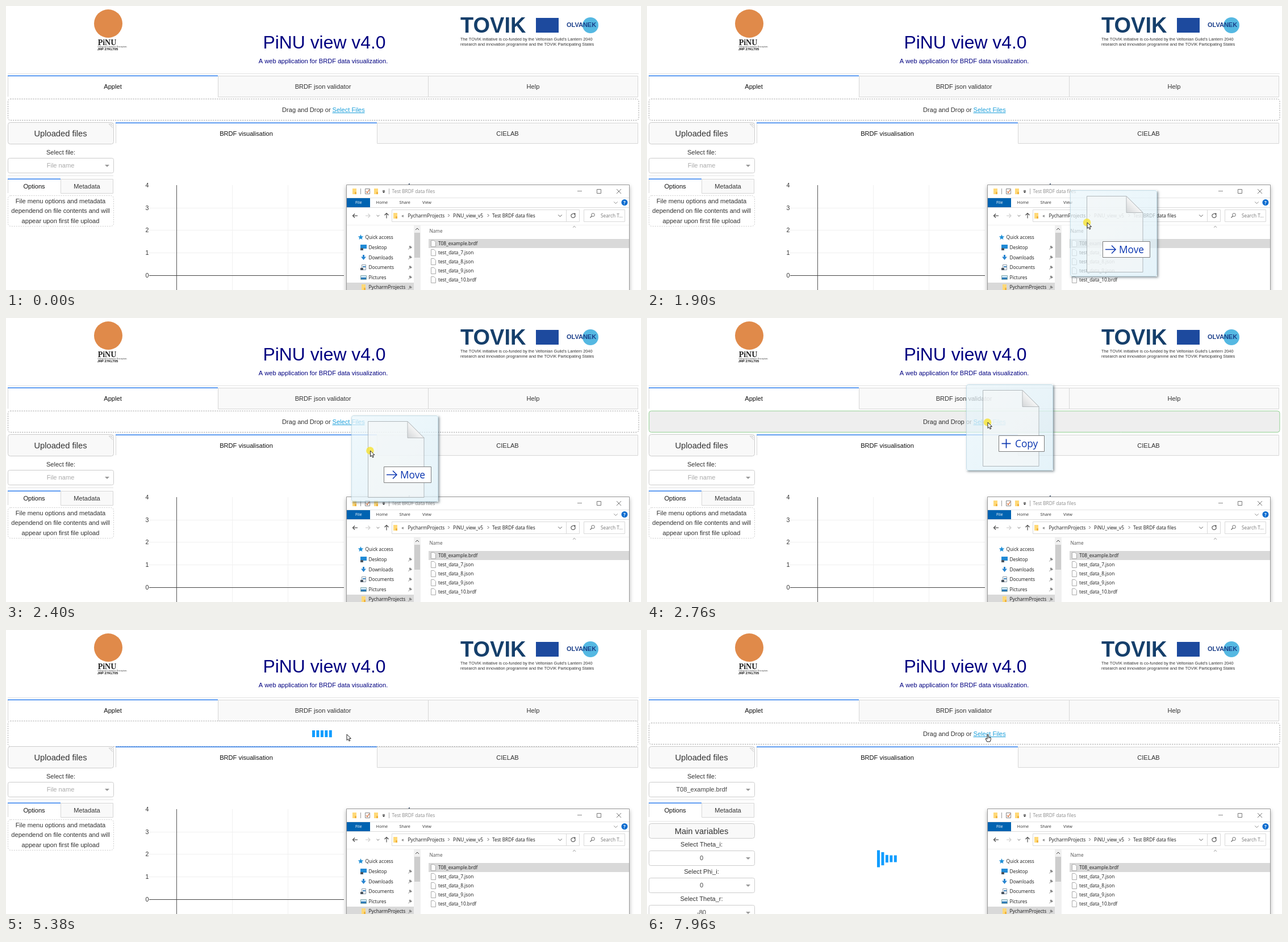
Recreate the animation shown at these times as an HTML page with a canvas. Size 1118 px wide and 501 px high, loop 8 s.

```html
<!DOCTYPE html>
<html lang="en">
<head>
<meta charset="utf-8">
<title>BRDF viewer upload</title>
<style>
html, body { margin: 0; width: 100%; height: 100%; overflow: hidden; background: #fff; }
canvas { display: block; }
</style>
</head>
<body>
<canvas id="stage" width="1118" height="501"></canvas>
<script>
const ctx = document.getElementById('stage').getContext('2d');
const SANS = '"Liberation Sans", Arial, sans-serif';
const UI = '"Open Sans", "Noto Sans", sans-serif';
const SERIF = '"Liberation Serif", serif';
const LOOP = 8000, BODY = 11.1, UI_SIZE = 8.3;
const BLUE = '#2f7fee', EDGE = '#d6d6d6', LOADER = '#119dff';

// ---------- drawing helpers ----------
function text(str, x, y, color = '#333', size = BODY, align = 'center', family = SANS, weight = '') {
  ctx.font = `${weight} ${size}px ${family}`;
  ctx.textAlign = align;
  ctx.fillStyle = color;
  ctx.fillText(str, x, y);
}
const ui = (str, x, y, color = '#1a1a1a', size = UI_SIZE) => text(str, x, y, color, size, 'left', UI);

function fill(x, y, w, h, color) {
  ctx.fillStyle = color;
  ctx.fillRect(x, y, w, h);
}
function box(x, y, w, h, r, bg, edge, dash = []) {
  ctx.beginPath();
  ctx.roundRect(x, y, w, h, r);
  if (bg) { ctx.fillStyle = bg; ctx.fill(); }
  ctx.setLineDash(dash);
  ctx.strokeStyle = edge;
  ctx.lineWidth = 1;
  ctx.stroke();
  ctx.setLineDash([]);
}
function line(points, color, width = 1) {
  ctx.beginPath();
  for (let i = 0; i < points.length; i += 2) ctx.lineTo(points[i], points[i + 1]);
  ctx.strokeStyle = color;
  ctx.lineWidth = width;
  ctx.stroke();
}
function shape(points, color, edge) {
  ctx.beginPath();
  for (let i = 0; i < points.length; i += 2) ctx.lineTo(points[i], points[i + 1]);
  ctx.closePath();
  ctx.fillStyle = color;
  ctx.fill();
  if (edge) { ctx.strokeStyle = edge; ctx.lineWidth = 1; ctx.stroke(); }
}
function disc(x, y, r, color) {
  ctx.beginPath();
  ctx.arc(x, y, r, 0, 2 * Math.PI);
  ctx.fillStyle = color;
  ctx.fill();
}

// ---------- web page ----------
function header() {
  disc(180, 31, 25, '#e08a4a');
  text('PiNU', 178, 69, '#222', 14, 'center', SERIF, 'bold');
  text('Orthogonal Luminance Descriptions', 187, 73, '#333', 3.5, 'center', SERIF);
  text('JRP 27KLT05', 179, 78, '#111', 5.8, 'center', SANS, 'bold');

  text('PiNU view v4.0', 560.5, 75, '#000080', 31.9);
  text('A web application for BRDF data visualization.', 558.5, 101, '#000080');

  text('TOVIK', 800, 47, '#153f6b', 38, 'left', SANS, 'bold');
  fill(933, 21, 40, 26, '#1d4a9e');
  disc(1029, 34, 14, '#55b8e2');
  text('OLVANEK', 987, 37, '#1b3f8a', 11, 'left', SANS, 'bold');
  text("The TOVIK initiative is co-funded by the Veltonian Guild's Lantern 2040", 800, 60.5, '#333', 7.4, 'left');
  text('research and innovation programme and the TOVIK Participating States', 800, 69.5, '#333', 7.4, 'left');
  fill(3, 119, 1111, 1, '#e1e1e1');
}

function tabs(x, y, w, h, labels) {
  labels.forEach((label, i) => {
    const left = x + i * w;
    if (i) {
      box(left + .5, y + .5, w - 1 + (i < labels.length - 1), h, 0, '#f9f9f9', EDGE);
    } else {
      line([left + .5, y, left + .5, y + h], EDGE);
      fill(left, y - .5, w, 1.5, BLUE);
    }
    text(label, left + w / 2, y + h / 2 + 4.7, i ? '#333' : '#111');
  });
}

function dropZone(t) {
  if (t >= 3330 && t < 6690) {
    box(3.5, 160.5, 1109, 45, 4, '#fff', '#a5a5a5', [2, 2]);
    loader(539, 183, t - 3315);
    return;
  }
  const active = t >= 2660 && t < 3160;
  if (active) box(3.5, 164, 1110.5, 37.5, 4, '#eee', '#93d193');
  else box(3.5, 164, 1110.5, 37.5, 4, '#fff', '#999', [2, 2]);
  text('Drag and Drop or', 486, 187, '#333', BODY, 'left');
  text('Select Files', 574.5, 187, '#1ea0db', BODY, 'left');
  fill(574.5, 188, 57, 1, '#1ea0db');
}

// Five bars stretch one after another, then rest.
function loader(x, cy, t) {
  const u = (t / 1205 % 1 + 1) % 1;
  for (let i = 0; i < 5; i++) {
    const v = Math.max(0, 1 - Math.abs(u - i / 12 - .2) / .2);
    const h = 12 + 18 * v * v * (3 - 2 * v);
    fill(x + i * 7.45, cy - h / 2, 5, h, LOADER);
  }
}

function dropdown(y, label, color = '#444') {
  box(3.5, y + .5, 186, 26, 3, '#fff', '#ccc');
  text(label, 96, y + 17, color);
  shape([174, y + 12, 182, y + 12, 178, y + 16], '#999');
}
function heading(y, h, label) {
  box(3.5, y + .5, 186, h, 4, '#f9f9f9', '#ccc');
  text(label, 96, y + h / 2 + 6, '#333', 14.7);
}

function sidebar(t) {
  const loaded = t >= 7080;
  heading(205, 38, 'Uploaded files');
  line([181, 208, 188, 215], '#bbb', .8);
  line([184, 208, 188, 212], '#bbb', .8);
  line([181, 208, 188, 208], '#ccc', .8);
  text('Select file:', 96.5, 261.5);
  if (loaded) dropdown(268, 'T08_example.brdf');
  else dropdown(268, 'File name', '#aaa');
  fill(3, 299, 186, 1, '#e1e1e1');
  tabs(3, 305, 93, 25, ['Options', 'Metadata']);

  if (!loaded) {
    box(3.5, 334.5, 186, 54, 5, null, '#ccc', [2, 2]);
    ['File menu options and metadata', 'dependend on file contents and will', 'appear upon first file upload']
      .forEach((s, i) => text(s, 96, 347.5 + i * 17.8));
    return;
  }
  fill(3, 337, 186, 1, '#e6e6e6');
  heading(341, 26, 'Main variables');
  [['Theta_i', '0'], ['Phi_i', '0'], ['Theta_r', '-80']].forEach(([name, value], i) => {
    text(`Select ${name}:`, 96, 382 + i * 48.2);
    dropdown(Math.round(389 + i * 48.2), value);
  });
}

function graph(t) {
  if (t >= 7740) {
    loader(405, 403.5, t - 7720);
    return;
  }
  for (let v = 0; v < 5; v++) {
    const y = Math.round(475 - v * 39.8);
    if (v && v < 4) fill(252, y, 343, 1, '#f0f0f0');
    text(v, 251.5, y + 4, '#333', 10.6, 'right');
  }
  fill(398, 316, 1, 185, '#f0f0f0');
  fill(496, 316, 1, 185, '#f0f0f0');
  fill(300, 316, 1, 185, '#555');
  fill(252, 475, 343, 1, '#444');
  text('4', 709, 320.5, '#2a3f5f');
  fill(760, 315, 2, 1, '#ccc');
}

// ---------- file window ----------
function folder(x, y, w = 8, h = 10) {
  fill(x, y, w, h, '#ffd978');
  fill(x + w - 3, y + h - 4, 3, 4, '#f0b440');
}
function chevron(x, y, dx, dy, color = '#555') {
  // dx, dy point where the tip goes
  line([x - dx - 2 * dy, y - dy - 2 * dx, x + dx, y + dy, x - dx + 2 * dy, y - dy + 2 * dx], color);
}
function arrow(x1, y1, x2, y2, color, head = 3.5, width = 1.1) {
  const d = Math.hypot(x2 - x1, y2 - y1), ux = (x2 - x1) / d * head, uy = (y2 - y1) / d * head;
  line([x1, y1, x2, y2], color, width);
  line([x2 - ux - uy, y2 - uy + ux, x2, y2, x2 - ux + uy, y2 - uy - ux], color, width);
}
function star(x, y, r, color) {
  const pts = [];
  for (let i = 0; i < 10; i++) {
    const a = i * Math.PI / 5 - Math.PI / 2, k = i % 2 ? r * .45 : r;
    pts.push(x + k * Math.cos(a), y + k * Math.sin(a));
  }
  shape(pts, color);
}

function titleBar() {
  folder(610, 322, 7);
  fill(624, 322, 1, 10, '#999');
  box(632.5, 322.5, 8, 9, 0, '#fff', '#888');
  line([634, 327, 636, 329.5, 639.5, 324], '#d2622a', 1.2);
  folder(648, 322, 7);
  fill(663, 325, 4, 1, '#333');
  shape([662.5, 327, 667.5, 327, 665, 330], '#333');
  fill(674, 322, 1, 10, '#aaa');
  ui('Test BRDF data files', 679.5, 330.2, '#8a8a8a');
  fill(1006, 326, 8, 1, '#888');
  box(1040.5, 323.5, 7, 7, 0, null, '#777');
  line([1075, 323, 1083, 331], '#777');
  line([1083, 323, 1075, 331], '#777');
}

function ribbon() {
  fill(600, 338, 497, 1, '#e3e3e3');
  fill(600, 339, 41, 16, '#0063b1');
  ui('File', 615, 349.2, '#fff', 7.3);
  ui('Home', 651.5, 349.2, '#333', 7.3);
  ui('Share', 692.5, 349.2, '#333', 7.3);
  ui('View', 733, 349.2, '#333', 7.3);
  chevron(1073.5, 347, 0, 1.6, '#888');
  disc(1089, 346.5, 5.5, '#0a6ccf');
  text('?', 1089, 349.5, '#fff', 8, 'center', UI, 'bold');
  fill(600, 355, 497, 1, '#dcdcdc');
}

function addressBar() {
  arrow(619, 370, 610.5, 370, '#444');
  arrow(633, 370, 641, 370, '#ccc');
  chevron(655, 370, 0, 1.2, '#777');
  arrow(670, 374.5, 670, 365.5, '#444');
  box(679.5, 359.5, 330, 21, 0, '#fff', '#d9d9d9');
  fill(986, 360, 1, 21, '#d9d9d9');
  folder(682, 365, 7);
  ui('«', 696.5, 372.5, '#333');
  ui('PycharmProjects', 707.5, 373);
  chevron(779.5, 369.5, 1.2, 0);
  ui('PiNU_view_v5', 787, 373);
  chevron(849, 369.5, 1.2, 0);
  ui('Test BRDF data files', 856, 373);
  chevron(975.5, 370, 0, 1.6);
  ctx.beginPath();
  ctx.arc(998.5, 370, 3.5, -.5, 5);
  ctx.strokeStyle = '#555';
  ctx.lineWidth = 1.1;
  ctx.stroke();
  shape([999, 365, 1003, 366, 1001.5, 369.5], '#555');
  box(1017.5, 359.5, 72, 21, 0, '#fff', '#d9d9d9');
  ctx.beginPath();
  ctx.arc(1033.5, 368.5, 2.8, 0, 7);
  ctx.strokeStyle = '#666';
  ctx.stroke();
  line([1031.5, 370.5, 1028.5, 373.5], '#666', 1.2);
  ui('Search T...', 1047, 373, '#777');
}

function navPane() {
  fill(600, 488, 118, 13, '#d9d9d9');
  star(624.5, 408, 5, '#1e90d8');
  ui('Quick access', 632.5, 411);
  ['Desktop', 'Downloads', 'Documents', 'Pictures', 'PycharmProjects'].forEach((name, i) => {
    const y = 426 + i * 17.6;
    ui(name, 638.5, y + 3);
    shape([711, y - 3.5, 715, y, 712, y + 2, 709.5, y - 1], '#888');
    line([711, y + .5, 708.5, y + 3.5], '#888');
  });
  fill(624, 421, 11, 7, '#1f8ad6');
  fill(624, 427, 5, 4, '#4a5560');
  fill(628, 439, 3, 4, '#2a86d1');
  shape([625, 442.5, 634, 442.5, 629.5, 448], '#2a86d1');
  box(626.5, 456.5, 7, 9, 0, '#fff', '#8a9aa8');
  fill(628, 459, 5, 2, '#3f86c0');
  fill(624, 462, 5, 4, '#4a5560');
  box(624.5, 475.5, 10, 7, 0, '#cfe8f8', '#8aa');
  fill(625, 479, 9, 3, '#2f7cb8');
  folder(626, 491, 7);
  fill(718, 386, 12, 115, '#f0f0f0');
  fill(719, 400, 10, 44, '#cdcdcd');
  chevron(724, 393.5, 0, -1.5, '#444');
}

function fileList(hover) {
  ui('Name', 745.5, 400, '#555');
  chevron(1000.5, 389.5, 0, -1.2, '#888');
  ['T08_example.brdf', 'test_data_7.json', 'test_data_8.json', 'test_data_9.json', 'test_data_10.brdf'].forEach((name, i) => {
    const y = 411 + i * 16;
    if (!i) fill(744, y, 353, 16, '#d9d9d9');
    else if (i === hover) fill(744, y, 353, 16, '#e5f3ff');
    shape([748.5, y + 2.5, 753.5, y + 2.5, 756.5, y + 5.5, 756.5, y + 13.5, 748.5, y + 13.5], '#fff', '#aaa');
    ui(name, 761, y + 11.3);
  });
}

function fileWindow(hover) {
  ctx.save();
  ctx.shadowColor = 'rgba(0,0,0,.3)';
  ctx.shadowBlur = 7;
  ctx.shadowOffsetY = 2;
  fill(599, 316, 499, 200, '#fff');
  ctx.restore();
  box(599.5, 315.5, 498, 200, 0, '#fff', '#9a9a9a');
  titleBar();
  ribbon();
  addressBar();
  fill(600, 386, 497, 1, '#f0f0f0');
  navPane();
  fileList(hover);
}

// ---------- pointer and dragged file ----------
const clamp = v => Math.min(1, Math.max(0, v));
const mix = (a, b, k) => [a[0] + (b[0] - a[0]) * k, a[1] + (b[1] - a[1]) * k];

// Each leg: start time, end time, from, to, ease-out power.
const LEGS = [
  [420, 870, [1106, 492], [838, 423], 2],
  [1100, 1150, [838, 423], [808, 421], 1],
  [1800, 2110, [808, 421], [707, 301], 1],
  [2110, 2600, [707, 301], [612, 204], 1.3],
  [2610, 2730, [612, 204], [600, 184], 1]
];
function pointer(t) {
  const [t0, t1, from, to, power] = LEGS.filter(leg => t >= leg[0]).pop() || LEGS[0];
  return mix(from, to, 1 - (1 - clamp((t - t0) / (t1 - t0))) ** power);
}

// The file image trails the pointer slightly.
function draggedFile(t) {
  const [px, py] = pointer(Math.max(1800, t - 25));
  const copy = t >= 2660;
  ctx.save();
  ctx.translate(Math.round(px - 38), Math.round(py - 67));

  // Shadow only outside the tinted panel
  ctx.save();
  ctx.beginPath();
  ctx.rect(-20, -20, 200, 200);
  ctx.rect(0, 0, 153, 152);
  ctx.clip('evenodd');
  ctx.shadowColor = 'rgba(60,80,90,.6)';
  ctx.shadowBlur = 4;
  ctx.shadowOffsetX = ctx.shadowOffsetY = 2;
  fill(0, 0, 153, 152, '#9ab');
  ctx.restore();

  const tint = ctx.createLinearGradient(0, 0, 153, 152);
  tint.addColorStop(0, 'rgba(234,246,251,.7)');
  tint.addColorStop(1, 'rgba(218,238,247,.7)');
  box(.5, .5, 152, 151, 3, tint, 'rgba(185,215,228,.8)');

  shape([29.5, 10.5, 99, 10.5, 128, 39.5, 128, 144.5, 29.5, 144.5], 'rgba(246,247,248,.65)', 'rgba(160,168,172,.8)');
  const fold = ctx.createLinearGradient(99, 40, 114, 25);
  fold.addColorStop(0, '#d2d5d7');
  fold.addColorStop(1, '#f6f6f6');
  shape([99, 10.5, 128, 39.5, 99, 39.5], fold, '#b5babd');

  box(57.5, 90.5, copy ? 80 : 83, 28, 0, '#fff', '#7d7d7d');
  const ink = '#0a35b0';
  if (copy) {
    line([62.5, 104.5, 78.5, 104.5], ink, 1.7);
    line([70.5, 96.5, 70.5, 112.5], ink, 1.7);
  } else {
    arrow(62, 104.5, 80, 104.5, ink, 7, 1.5);
  }
  ui(copy ? 'Copy' : 'Move', 86, 111, ink, 17.3);
  ctx.restore();
}

function arrowCursor(x, y) {
  shape([0, 0, 0, 10.5, 2.4, 8.3, 4, 12, 5.8, 11.2, 4.2, 7.7, 7.4, 7.4]
    .map((v, i) => v + (i % 2 ? y : x)), '#fff', '#222');
}
function handCursor(x, y) {
  shape([-1, 0, 1, 0, 1, 4, 5, 5, 5.5, 8, 4, 12.5, -1.5, 12.5, -4, 7.5, -3, 6.5, -1, 8]
    .map((v, i) => v + (i % 2 ? y : x)), '#fff', '#222');
  line([x + 1, y + 4, x + 1, y + 7], '#444', .8);
  line([x + 3, y + 5, x + 3, y + 7], '#444', .8);
}

function draw(t) {
  fill(0, 0, 1118, 501, '#fff');
  const [x, y] = pointer(t);
  const inList = t >= 420 && t < 1800 && x < 1097;
  header();
  tabs(3, 123, 370, 37, ['Applet', 'BRDF json validator', 'Help']);
  dropZone(t);
  sidebar(t);
  tabs(193, 206, 460, 36, ['BRDF visualisation', 'CIELAB']);
  graph(t);
  fileWindow(inList ? Math.floor((y + 3.5 - 411) / 16) : -1);

  const pressed = t >= 1800 && t < 3080;
  if (pressed && y < 409) draggedFile(t);
  if (pressed) disc(x - .5, y, 6.8, 'rgba(246,226,50,.8)');
  if (t >= 6740) handCursor(600, 184.5);
  else if (t >= 420) arrowCursor(x, y);
}

const start = performance.now();
function tick() {
  draw((performance.now() - start) % LOOP);
  requestAnimationFrame(tick);
}
tick();
</script>
</body>
</html>
```
